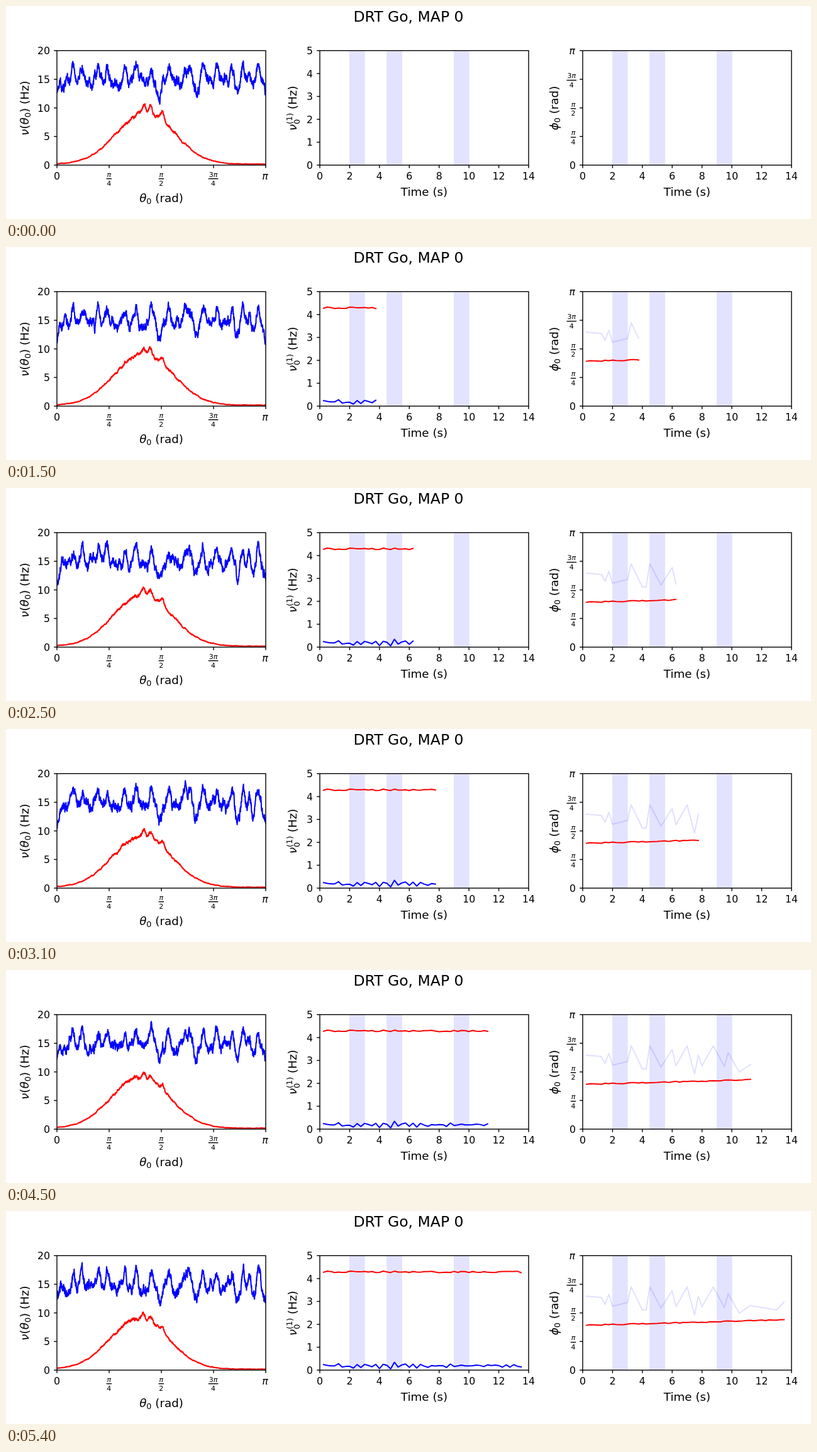
Write an HTML page that moves like this. It is 1280 px wide and 340 px high and loops after 5.5 s.

```html
<!DOCTYPE html>
<html lang="en">
<head>
<meta charset="utf-8">
<title>Rate and phase over time</title>
<style>
html, body { margin: 0; width: 100%; height: 100%; overflow: hidden; background: #fff; }
svg { display: block; width: 1280px; height: 340px; font-family: "DejaVu Sans", sans-serif; }
.line { fill: none; stroke-width: 2; stroke-linejoin: round; stroke-linecap: square; }
.axis { fill: none; stroke: #000; stroke-width: 1.4; }
.band { fill: #00f; stroke: #00f; opacity: .11; }
.tick { font-size: 15.7px; }
.label { font-size: 18.3px; }
.small { font-size: 12.8px; }
.frac { font-size: 11px; }
.title { font-size: 23.5px; }
.it { font-style: italic; }
</style>
</head>
<body>
<svg id="stage" viewBox="0 0 1280 340"></svg>
<script>
const STEP = 100, COUNT = 55;
const W = 332, TOP = 71.3, BOTTOM = 254, H = BOTTOM - TOP;
const LEFT = [81, 499, 917];
const SEC = W / 14;

// Fixed features of the spatial curves, by x
const bluePeaks = [107, 121, 147, 161, 190, 207, 231, 259, 285, 292, 313, 335, 360, 377, 388, 401];
const blueDips = [81, 244, 302, 368, 392, 413];
const redPeaks = [219, 230, 249];

// Turning points of the pale phase trace: sample, height
const turns = [
  [1, 136], [5, 138], [6, 149], [7, 133], [8, 152], [12, 146], [13, 121], [16, 158], [17, 158], [18, 121],
  [21, 155], [24, 127], [25, 153], [28, 121], [30, 166], [31, 136], [32, 153], [35, 121], [38, 154],
  [39, 132], [42, 163], [45, 151], [52, 158], [54, 145]];

const out = [];
const add = s => out.push(s);
const text = (x, y, s, cls = "tick", anchor = "middle") =>
  add(`<text x="${x}" y="${y}" class="${cls}" text-anchor="${anchor}">${s}</text>`);
const rule = (x1, y1, x2, y2) => add(`<path class="axis" d="M${x1} ${y1}L${x2} ${y2}"/>`);
const it = s => `<tspan class="it">${s}</tspan>`;
const sub = s => `<tspan class="small" dy="3">${s}</tspan><tspan dy="-3">&#8203;</tspan>`;
const PI = it("π");

function frac(x, y, top, bottom) {
  const half = top.startsWith("3") ? 7.8 : 4.2;
  text(x, y - 3.2, top, "frac");
  text(x, y + 11.2, bottom, "frac");
  rule(x - half, y, x + half, y);
}
function upright(x, y, content) {
  add(`<g transform="translate(${x} ${y}) rotate(-90)">`);
  content();
  add("</g>");
}
const xTick = x => rule(x, BOTTOM, x, BOTTOM + 4.8);
const yTick = (x, y) => rule(x - 4.8, y, x, y);
const xLabel = (x, s) => text(x, 277.2, s);
const yLabel = (x, y, s) => text(x - 11, y + 5.9, s, "tick", "end");

function buildStage() {
  add("<defs>");
  LEFT.forEach((x, i) =>
    add(`<clipPath id="clip${i}"><rect x="${x}" y="${TOP}" width="${W}" height="${H}"/></clipPath>`));
  add("</defs>");
  text(640, 24.7, "DRT Go, MAP 0", "title");

  const lines = [[["curveBlue", "#00f"], ["curveRed", "#f00"]],
                 [["rateBlue", "#00f"], ["rateRed", "#f00"]],
                 [["phaseBlue", "rgba(0,0,255,.12)"], ["phaseRed", "#f00"]]];
  LEFT.forEach((x, i) => {
    add(`<g clip-path="url(#clip${i})">`);
    if (i) for (const [from, to] of [[2, 3], [4.5, 5.5], [9, 10]])
      add(`<rect class="band" x="${x + from * SEC}" y="${TOP - 2}" width="${(to - from) * SEC}" height="${H + 4}"/>`);
    for (const [id, color] of lines[i]) add(`<path id="${id}" class="line" stroke="${color}"/>`);
    add("</g>");
    add(`<rect class="axis" x="${x}" y="${TOP}" width="${W}" height="${H}"/>`);
    if (!i) return;
    for (let s = 0; s <= 14; s += 2) {
      xTick(x + s * SEC);
      xLabel(x + s * SEC, s);
    }
    text(x + W / 2, 303.3, "Time (s)", "label");
  });

  const [a, b, c] = LEFT;
  for (let k = 0; k <= 4; k++) {
    const y = BOTTOM - k * H / 4;
    xTick(a + k * W / 4);
    yTick(a, y);
    yTick(c, y);
    yLabel(a, y, k * 5);
  }
  xLabel(a, "0");
  frac(163.8, 275.7, PI, "4");
  frac(246.8, 275.7, PI, "2");
  frac(329.6, 275.7, "3" + PI, "4");
  xLabel(412, PI);
  text(247, 312.5, it("θ") + sub("0") + " (rad)", "label");

  for (let k = 0; k <= 5; k++) {
    const y = BOTTOM - k * H / 5;
    yTick(b, y);
    yLabel(b, y, k);
  }

  yLabel(c, BOTTOM, "0");
  frac(902, 209.5, PI, "4");
  frac(902, 163.8, PI, "2");
  frac(899.3, 118.5, "3" + PI, "4");
  text(900.3, 77.3, PI);

  upright(36, 163, () => text(0, 0, it("ν") + "(" + it("θ") + sub("0") + ") (Hz)", "label"));
  upright(462, 199, () => {
    text(0, 0, it("ν"), "label", "start");
    text(10.2, -7, "(1)", "small", "start");
    text(10.2, 5, "0", "small", "start");
    text(34, 0, "(Hz)", "label", "start");
  });
  upright(877.5, 163, () => text(0, 0, it("ϕ") + sub("0") + " (rad)", "label"));
  document.getElementById("stage").innerHTML = out.join("");
}

function random(seed) {
  let s = seed * 7919 + 12345 | 0;
  return () => {
    s = s + 0x6D2B79F5 | 0;
    let r = Math.imul(s ^ s >>> 15, 1 | s);
    r = r + Math.imul(r ^ r >>> 7, 61 | r) ^ r;
    return ((r ^ r >>> 14) >>> 0) / 4294967296;
  };
}
const spread = (seed, n) => {
  const rnd = random(seed);
  return Array.from({ length: n }, () => rnd() * 2 - 1);
};
const mix = (a, b, k) => a + (b - a) * k;
const bell = (d, width) => Math.exp(-d * d / (2 * width * width));
const bells = (centers, x, width) => centers.reduce((sum, c) => sum + bell(x - c, width), 0);
function along(keys, x) {
  const i = Math.max(1, keys.findIndex(k => k[0] >= x));
  const [x0, y0] = keys[i - 1], [x1, y1] = keys[i];
  return mix(y0, y1, (x - x0) / (x1 - x0));
}
const path = pts => pts.length > 1 ? "M" + pts.map(p => p[0].toFixed(2) + " " + p[1].toFixed(2)).join("L") : "";

// A mean curve with slow wobble and fine jitter, both scaled by amount(y)
function noisy(seed, mean, amount, slow, fast) {
  const wobble = spread(seed, 90), rnd = random(seed + 500), pts = [];
  let jitter = 0;
  for (let x = 0; x <= W; x += .2) {
    const i = Math.floor(x / 4), y = mean(LEFT[0] + x);
    jitter = .7 * jitter + (rnd() - .5) * fast;
    pts.push([LEFT[0] + x, y + amount(y) * (slow * mix(wobble[i], wobble[i + 1], x / 4 - i) + jitter)]);
  }
  return path(pts);
}

const blueMean = x => 122 - 25 * bells(bluePeaks, x, 2.6) + 20 * bells(blueDips, x, 3);
const redMean = k => x =>
  252.5 - 82 * bell(x - mix(222, 212, k), 46) - mix(12, 7, k) * bells(redPeaks, x, 2.6);

// Quarter-second traces
const ripple = spread(7, COUNT), shake = spread(21, COUNT), drift = spread(33, COUNT);
const toY = hz => BOTTOM - hz * H / 5;
const traces = {
  rateBlue: [1, i => toY(.19 + .13 * Math.exp(1 - i) + .05 * ripple[i] +
    (.03 + .09 * bell(i - 18, 7)) * Math.cos(i * Math.PI * .8))],
  rateRed: [1, i => toY(4.29 + .035 * shake[i])],
  phaseBlue: [2, i => along(turns, i)],
  phaseRed: [2, i => 182.5 - i * .16 + .8 * drift[i]]
};

buildStage();
const set = (id, d) => document.getElementById(id).setAttribute("d", d);

function draw(n) {
  set("curveBlue", noisy(n + 1, blueMean, () => 1, 9, 10));
  set("curveRed", noisy(n + 101, redMean(n / (COUNT - 1)), y => .1 + (254 - y) / 95, 3, 3));
  for (const [id, [panel, y]] of Object.entries(traces))
    set(id, path(Array.from({ length: n }, (_, j) => [LEFT[panel] + (j + 1) * SEC / 4, y(j + 1)])));
}

const start = performance.now();
let shown = -1;
function tick() {
  const n = Math.floor((performance.now() - start) / STEP) % COUNT;
  if (n !== shown) draw(shown = n);
  requestAnimationFrame(tick);
}
tick();
</script>
</body>
</html>
```
